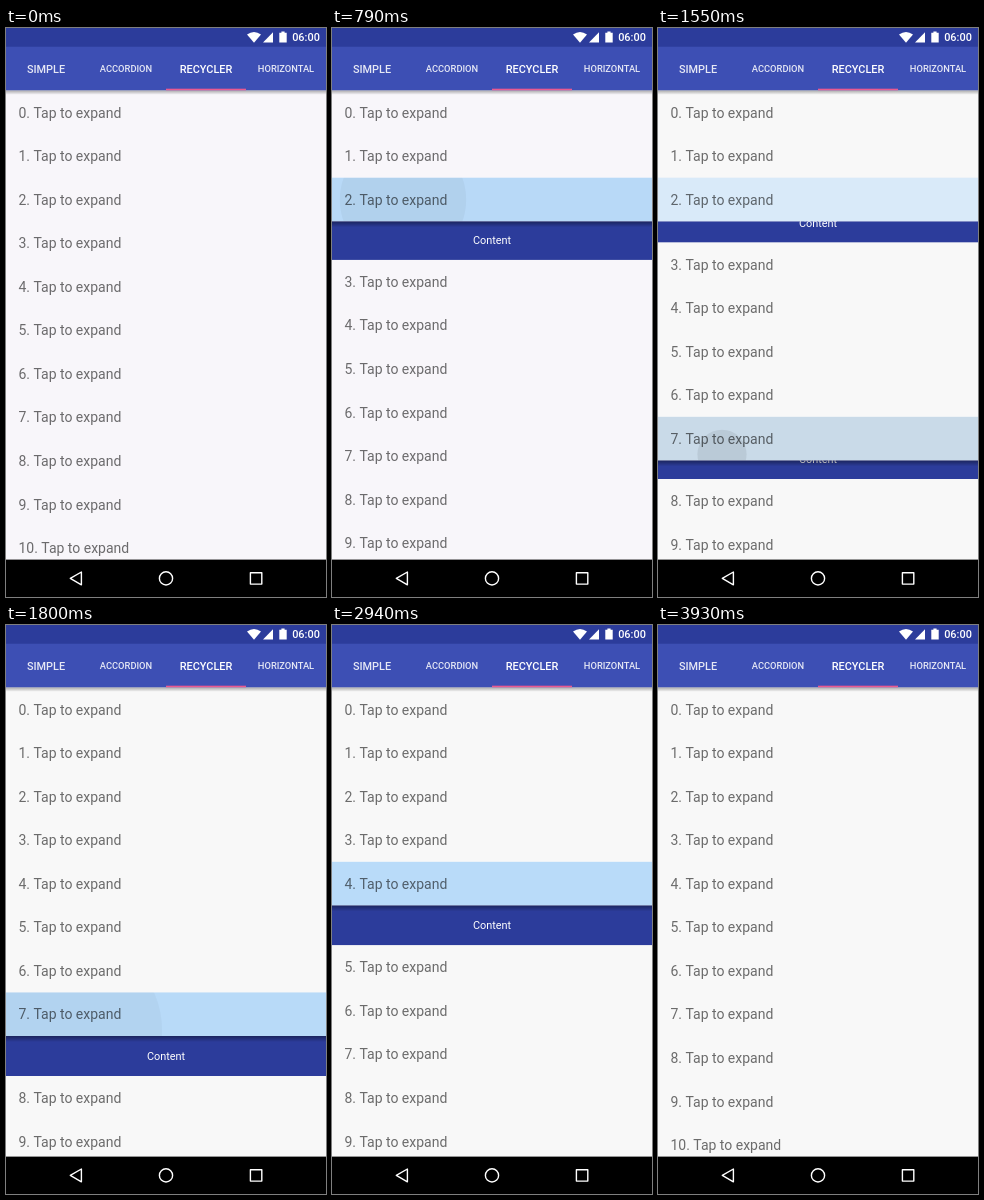
An HTML page with a canvas for the animation above (4.46 s loop, 320x569 px).

```html
<!DOCTYPE html>
<html lang="en">
<head>
<meta charset="utf-8">
<title>Expandable list</title>
<style>
  html, body { margin: 0; width: 100%; height: 100%; overflow: hidden; }
  canvas { display: block; width: 320px; height: 569px; }
</style>
</head>
<body>
<canvas></canvas>
<script>
const W = 320, H = 569, LOOP = 4460;
const LIST_TOP = 62.6, ROW = 43.55, PANEL = 40, NAV_TOP = 531.6;
const INDIGO = '#3d4fb4', DARK_INDIGO = '#2c3c9b';

// When each row opens and closes
const panels = [
  { row: 2, open: 560, close: 1450 },
  { row: 7, open: 1450, close: 2473 },
  { row: 4, open: 2473, close: 3620 }
];

// Touch ripples: growth in px/ms, fade in ms, press = whole-row darkening
const ripples = [
  { row: 2, start: 490, x: 71, y: 22, speed: .21, fade: 420, press: .05 },
  { row: 7, start: 1460, x: 64, y: 37.5, speed: .27, fade: 420, press: .065 },
  { row: 4, start: 2500, x: 70, y: 25, speed: .27, fade: 340, press: .05 },
  { row: 4, start: 3610, x: 78, y: 25, speed: .37, fade: 210, press: 0 }
];

const canvas = document.querySelector('canvas');
const ctx = canvas.getContext('2d');
const scale = window.devicePixelRatio || 1;
canvas.width = W * scale;
canvas.height = H * scale;

const clamp = v => Math.max(0, Math.min(1, v));

// cubic-bezier(.4, 0, .2, 1)
function ease(x) {
  if (x <= 0 || x >= 1) return clamp(x);
  let lo = 0, hi = 1, s;
  for (let i = 0; i < 20; i++) {
    s = (lo + hi) / 2;
    const u = 1 - s;
    if (1.2 * u * u * s + .6 * u * s * s + s ** 3 < x) lo = s; else hi = s;
  }
  return s * s * (3 - 2 * s);
}

function rect(x, y, w, h, color) {
  ctx.fillStyle = color;
  ctx.fillRect(x, y, w, h);
}

function text(str, x, y, size, color, weight = 400, align = 'center') {
  ctx.font = `${weight} ${size}px Roboto, sans-serif`;
  ctx.textAlign = align;
  ctx.fillStyle = color;
  ctx.fillText(str, x, y);
}

function clipped(x, y, w, h, draw) {
  ctx.save();
  ctx.beginPath();
  ctx.rect(x, y, w, h);
  ctx.clip();
  draw();
  ctx.restore();
}

function shadow(y, size, alpha) {
  const g = ctx.createLinearGradient(0, y, 0, y + size);
  g.addColorStop(0, `rgba(0,0,0,${alpha})`);
  g.addColorStop(1, 'rgba(0,0,0,0)');
  rect(0, y, W, size, g);
}

function drawRipple(r, top, t) {
  const age = t - r.start;
  const press = r.press * (clamp((age + 50) / 50) - clamp((age - 100) / 250));
  if (press > 0) rect(0, top, W, ROW, `rgba(0,0,0,${press})`);
  const alpha = .075 * (1 - clamp((age - 100) / r.fade));
  if (age <= 0 || alpha <= 0) return;
  clipped(0, top, W, ROW, () => {
    ctx.fillStyle = `rgba(0,0,0,${alpha})`;
    ctx.beginPath();
    ctx.arc(r.x, top + r.y, r.speed * age, 0, 7);
    ctx.fill();
  });
}

function drawList(t) {
  const warm = 1 - clamp((t - 800) / 700);
  rect(0, 0, W, H, `rgb(248,${248 - 2 * warm},${248 + 2 * warm})`);
  let top = LIST_TOP;
  for (let i = 0; i <= 10; i++) {
    const bottom = top + ROW;
    const p = panels.find(p => p.row === i);
    let height = 0;
    if (p) {
      const since = t - p.open, after = t - p.close;
      const tint = clamp(since / 200) - clamp(after / 200);
      height = PANEL * (ease(since / 300) - ease(after / 300));
      rect(0, top, W, ROW, `rgba(185,219,249,${tint})`);
      if (height > 0) clipped(0, bottom, W, height, () => {
        rect(0, bottom, W, height, DARK_INDIGO);
        text('Content', 160, bottom + height - 16, 10.9, '#fff');
        shadow(bottom, 6, .4 * Math.max(0, clamp(since / 100) - clamp(after / 30)));
      });
    }
    for (const r of ripples) if (r.row === i) drawRipple(r, top, t);
    text(`${i}. Tap to expand`, 12.4, top + 27, 14, 'rgba(0,0,0,.57)', 400, 'left');
    top = bottom + height;
  }
}

function drawHeader() {
  shadow(62.3, 4.5, .32);
  rect(0, 0, W, 62.3, INDIGO);
  rect(0, 0, W, 18.7, DARK_INDIGO);
  ['SIMPLE', 'ACCORDION', 'RECYCLER', 'HORIZONTAL'].forEach((name, i) =>
    text(name, 40 + 80 * i, i % 2 ? 44.4 : 44.9, i % 2 ? 9.33 : 10.9,
      i === 2 ? '#fff' : 'rgba(255,255,255,.87)', 500));
  rect(160, 60.7, 80, 1.6, '#ea5a90');

  ctx.fillStyle = '#fff';
  ctx.fill(new Path2D('M248 14.8L241 6.4Q248 1.4 255 6.4Z'));
  ctx.fill(new Path2D('M257 14.4H267V4.2Z'));
  ctx.fill(new Path2D('M273.3 4.8H275.4V3.6H278.6V4.8H280.7V14.4H273.3Z'));
  text('06:00', 300, 13.4, 10.9, '#fff', 500);
}

function drawNavBar() {
  rect(0, NAV_TOP, W, H - NAV_TOP, '#000');
  ctx.strokeStyle = '#fff';
  ctx.lineWidth = 1.4;
  ctx.lineJoin = 'round';
  ctx.stroke(new Path2D('M64.3 550.4L75.4 544V556.8Z'));
  ctx.beginPath();
  ctx.arc(160, 550.4, 6.6, 0, 7);
  ctx.stroke();
  ctx.strokeRect(244.4, 544.7, 11.4, 11.4);
}

const begin = performance.now();

function frame() {
  const t = (performance.now() - begin) % LOOP;
  ctx.setTransform(scale, 0, 0, scale, 0, 0);
  drawList(t);
  drawHeader();
  drawNavBar();
  requestAnimationFrame(frame);
}
frame();
</script>
</body>
</html>
```
